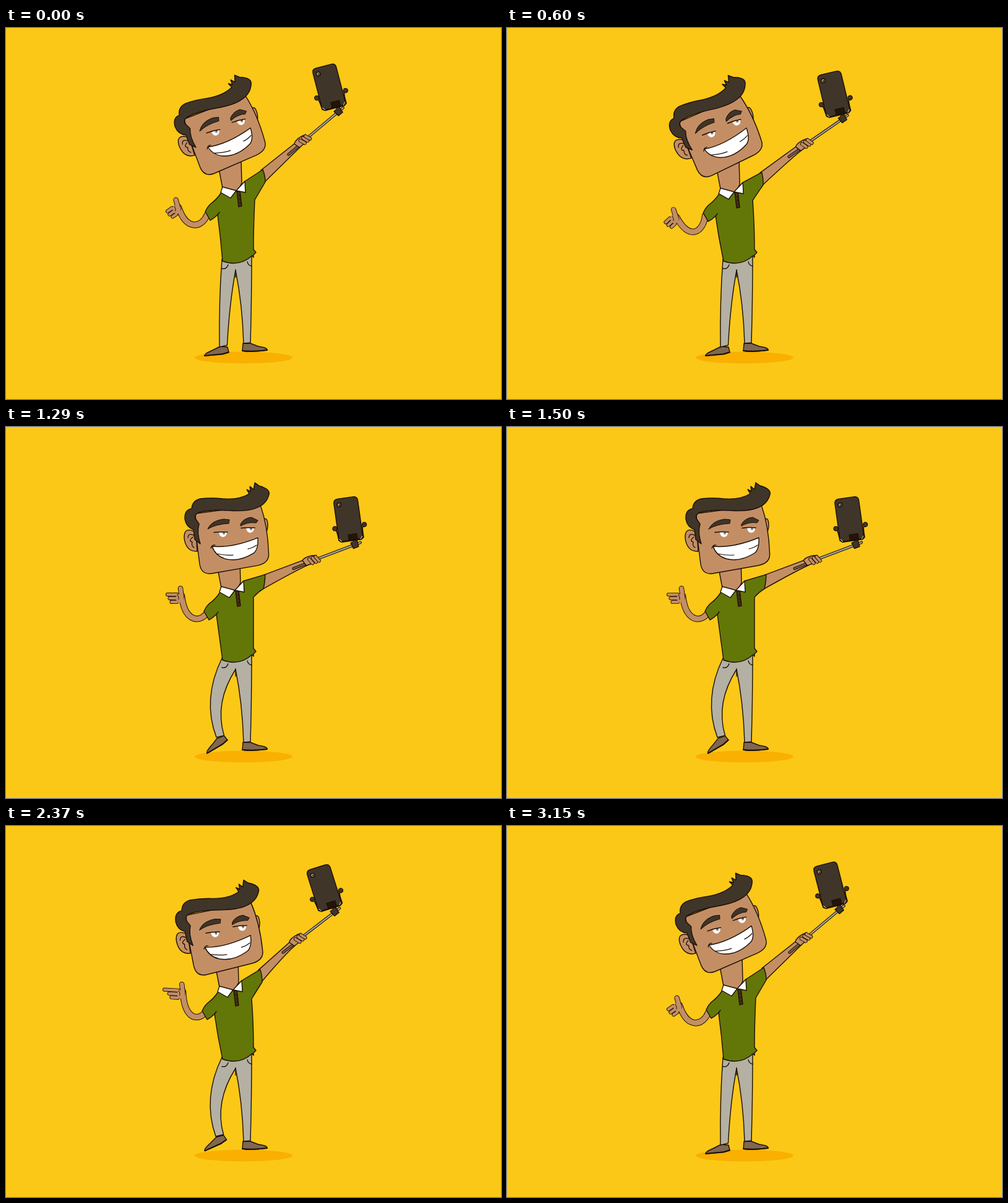
Animation of 800x600 px, one loop 3180 ms. Source, as an HTML page with a canvas:

```html
<!DOCTYPE html>
<html>
<head>
<meta charset="utf-8">
<style>
  html, body { margin: 0; width: 100%; height: 100%; overflow: hidden; background: #fcc817; }
  canvas { display: block; width: 800px; height: 600px; }
</style>
</head>
<body>
<canvas id="stage" width="800" height="600"></canvas>
<script>
const ctx = document.getElementById('stage').getContext('2d');
const INK = '#1d1007', SKIN = '#c48e65', HAIR = '#403529', SHIRT = '#637708',
      PANTS = '#b4b0a3', SHOE = '#806751', WHITE = '#fff';
const LOOP = 3180;
const rad = deg => deg * Math.PI / 180;

// Pose: collar x y | head x y angle scale | stick hand x y angle, phone angle |
//       free hand x y angle, finger stretch | left cuff x y, knee bend, shoe angle
const up    = [372, 262, 350.3, 166.5, -13.5, 1, 479, 183, -40, -14.5, 279, 290, -35, 0, 345, 516, 0, 0];
const dip   = [367, 264, 341.8, 168.7, -16, 1.01, 480, 189, -34.5, -13.5, 274, 306, -43, 0, 345, 516, 0, 0];
const low   = [374, 262, 359, 167.3, -7, 1, 498, 215, -20.7, -7.5, 284, 279, -16, .5, 345, 516, 0, 0];
const step  = [370, 263, 362.3, 173.3, 0, 1, 493, 216, -20.7, -8, 284, 273, 0, .5, 340, 502, -27, -25];
const kiss  = [363, 264, 353.7, 180.2, 3.7, 1.01, 484, 214, -21.4, -8, 281, 273, 8, 1, 339, 516, 3, 22];
const swing = [367, 264, 349.8, 174.2, -4, 1.01, 471, 184, -37.5, -17.5, 286, 268, 3, 1.1, 339, 502, -27, -19];

const mix = (a, b, k) => a.map((v, i) => v + (b[i] - v) * k);
const raise = (dx, dy, turn) => up.map((v, i) => v + ({ 6: dx, 7: dy, 8: turn }[i] || 0));
const rest = raise(3, -3, -3);

const keys = [
  [0, up], [60, up], [150, mix(up, dip, .4)], [300, rest], [510, rest],
  [610, dip], [645, dip], [870, mix(dip, low, 1.08)], [1020, low], [1050, low],
  [1330, mix(low, step, 1.06)], [1500, step], [1590, step],
  [1800, kiss], [1860, kiss], [2100, mix(kiss, step, .04)], [2160, mix(kiss, step, .04)],
  [2370, swing], [2530, raise(4, -11, -9)], [2670, mix(rest, dip, .04)], [2760, rest],
  [2940, rest], [3045, raise(5, -6, -8)], [3150, up], [LOOP, up]
];

function poseAt(t) {
  const i = keys.findIndex(k => k[0] > t);
  const [t0, a] = keys[i - 1], [t1, b] = keys[i];
  return mix(a, b, (1 - Math.cos(Math.PI * (t - t0) / (t1 - t0))) / 2);
}

function draw(path, fill, width = 1.4, stroke = INK) {
  const p = new Path2D(path);
  if (fill) { ctx.fillStyle = fill; ctx.fill(p); }
  if (width) { ctx.lineWidth = width; ctx.strokeStyle = stroke; ctx.stroke(p); }
}

// Fat line with an inked edge
function limb(path, width, color, edge = 1.3) {
  draw(path, null, width + edge * 2, INK);
  draw(path, null, width, color);
}

function dot(x, y, rx, ry, fill, width = 0) {
  ctx.beginPath();
  ctx.ellipse(x, y, rx, ry, 0, 0, 7);
  ctx.fillStyle = fill;
  ctx.fill();
  if (width) { ctx.lineWidth = width; ctx.strokeStyle = INK; ctx.stroke(); }
}

function group(x, y, angle, scale, body) {
  ctx.save();
  ctx.translate(x, y);
  ctx.rotate(rad(angle));
  ctx.scale(scale, scale);
  body();
  ctx.restore();
}

function legs(x, y, bend, shoe) {
  draw('M383 510L382 522Q390 525 422 521Q423 517 408 515L395 510Z', SHOE);
  draw('M382 522Q400 524 422 521', null, 2);
  group(x + 7, y, shoe, 1, () => {
    draw('M6 0L8 8L-2 11L-30 14Q-34 12 -18 5L-6 -1Z', SHOE);
    draw('M8 8.5L-2 11.5L-31 14', null, 2);
  });
  draw(`M349 374Q${344 + bend} 440 ${x} ${y}L${x + 12.5} ${y - 3}Q${361 + bend * .9} 446 371 392` +
       'Q382 446 384 510L395 509Q397 440 397 366Z', PANTS);
  draw('M371 391V403M349 389Q356 391 359 383M390 378Q391 384 397 385', null);
}

function freeArm(cx, cy, x, y, angle, stretch) {
  const sx = cx - 47, sy = cy + 40, drop = y - 268;
  limb(`M${sx} ${sy}C${sx - 14 + drop * .3} ${sy + 12 + drop * .35} ` +
       `${x + 2 + drop * .5} ${y + 40} ${x} ${y}`, 8.5, SKIN, 1);
  group(x, y, 0, 1, () => {
    const thumb = `M0 3L${-2 + angle * .07} -12`;
    dot(-5, 4, 7, 7, SKIN);
    limb(thumb, 6.5, SKIN, 1);
    group(-4, 4, angle, 1, () => {
      [[6, 11 + 3 * stretch], [0, 13 + 5 * stretch], [-6, 13 + 12 * stretch]]
        .forEach(([fy, len]) => limb(`M-4 ${fy}H${-len}`, 4.4, SKIN, .9));
      dot(1, 0, 6.5, 7, SKIN);
    });
    draw(thumb, null, 6, SKIN);
    draw('M-7 -2Q-4 2 -5 6', null, 1);
  });
}

function stickArm(cx, cy, k, x, y, angle) {
  const c = Math.cos(rad(angle)), s = Math.sin(rad(angle));
  const at = (px, py) => `${x + px * c - py * s} ${y + px * s + py * c}`;
  draw(`M${cx + 40 + 6 * k} ${cy - 32 + 9 * k}L${at(-8, -5)}L${at(-8, 5)}` +
       `Q${at(-34, 7)} ${cx + 45 - k} ${cy - 12 + 12 * k}Z`, SKIN);
}

function stick(x, y, angle, phoneAngle) {
  group(x, y, angle, 1, () => {
    limb('M-31 2H-10', 2.5, '#75614c', 1);
    limb('M8 1H85', 2.2, '#aaa69a', 1.1);
    draw('M-13 -5Q-8 -9 4 -7L11 -5L9 5L-10 5Z', SKIN);
    [-1, 5, 10].forEach(fx => limb(`M${fx - 1} -3L${fx + 2} 5`, 4, SKIN, .9));
    draw('M70 -4H81L80 6H71Z', HAIR);
  });
  const a = rad(angle);
  group(x + 76 * Math.cos(a) - Math.sin(a), y + 76 * Math.sin(a) + Math.cos(a), phoneAngle, 1, () => {
    draw('M-1 -10V0', null, 5, HAIR);
    ctx.translate(-4, 0);
    draw('M-25 -30Q-22 -28 -21 -10L-17 -7H15L19 -10Q18 -28 22 -30', null, 2);
    dot(-25, -30, 3.6, 3.6, HAIR, 1.2);
    dot(23, -30, 3.6, 3.6, HAIR, 1.2);
    draw('M-14 -77H11Q18 -77 18 -70V-15Q18 -8 11 -8H-14Q-21 -8 -21 -15V-70Q-21 -77 -14 -77Z', HAIR);
    draw('M-20 -12L-17 -8M17 -12L14 -8', null, 1, '#d8cfb8');
    draw('M-5 -17H9V-8H-5Z', '#241509');
    dot(-13, -67, 4, 4, INK);
    dot(-13, -67, 2.4, 2.4, '#b79a80');
    dot(-12.5, -66.5, 1.5, 1.5, HAIR);
  });
}

function torso(cx, cy, k) {
  const p = (x, y) => `${cx + x} ${cy + y}`;
  group(cx, cy, 0, 1, () => draw('M-29 -40L-22 -3L0 6L9 -11L8 -50Z', SKIN));
  draw(`M${p(-24, 4)}Q${p(-31, 15)} ${p(-42, 23)}Q${p(-47, 28)} ${p(-50, 35)}L${p(-42, 49)}` +
       `Q${p(-36, 46)} ${p(-30, 40)}Q${cx - 25} 340 350 377Q377 387 398 368L400 371L400 367L404 363L400 358` +
       `Q400 320 ${p(30, 16 - 4 * k)}Q${p(37, 4)} ${p(47 - k, -13 + 12 * k)}` +
       `Q${p(47 + 2 * k, -23 + 9 * k)} ${p(43 + 6 * k, -33 + 9 * k)}L${p(14, -14)}L${p(0, 2)}Z`, SHIRT);
  draw(`M${p(-30, 40)}L${p(-27, 36)}`, null);
  group(cx, cy, 0, 1, () => {
    draw('M1 2L6 1L9 26L4 27Z', '#4a3018');
    [9, 15, 21].forEach(y => dot(4.8 + y * .06, y, .9, .9, INK));
    draw('M-22 -5L0 1L-9 13L-25 4Z', WHITE);
    draw('M14 -14L15 4L0 1Z', WHITE);
  });
}

function eye(x, y) {
  draw(`M${x - 6} ${y}Q${x - 5} ${y + 8} ${x + 1} ${y + 8}Q${x + 7} ${y + 7} ${x + 7} ${y}Z`, WHITE, 0);
  dot(x + 2, y + 2, 1.8, 1.8, HAIR);
  dot(x + 2, y + 2.4, .8, .8, WHITE);
  draw(`M${x - 14} ${y + .5}Q${x - 4} ${y - 1} ${x + 8} ${y}`, null, 1.5);
}

function head(x, y, angle, scale, kissing) {
  group(x, y, angle, scale, () => {
    ctx.translate(-362.3, -173.3);
    draw('M416 149Q423 145 423 160Q422 171 418 174Z', SKIN);
    draw('M306 140L309 190L313 222Q316 239 332 237L406 224Q426 220 424.5 204Q423 160 411 126Z', SKIN);
    draw('M304 169Q287 161 288 180Q291 202 309 201L307 172Z', SKIN);
    draw('M305 176Q295 170 294 179M302 178Q294 184 301 186Q299 192 304 195', null, 1.3);
    draw('M314 189L305 182L303 166Q291 162 289 149Q288 134 300 132Q301 119 314 116Q332 114 350 116' +
         'Q377 118 393 108L389 101L395 104L394 96L400 101L402 90L409 95Q427 100 425 109' +
         'Q421 125 404 131Q389 137 360 135Q331 133 312 138Q304 141 306 148L312 157Q308 170 314 189Z', HAIR);
    draw('M326 165Q333 151 352 149L361 150L360 156Q339 157 326 165Z', HAIR, 1);
    eye(350, 170);
    if (kissing) {
      draw('M381 161Q389 154 405 156L411 160L382 163Z', HAIR, 1);
      ctx.setLineDash([4, 3]);
      draw('M381 166Q392 170 405 167', null, 1);
      ctx.setLineDash([]);
      draw('M369 191Q378 193 382 187Q389 187 387 192L382 196Q391 197 390 201Q388 205 380 203', null, 1.7);
    } else {
      draw('M379 157Q385 147 397 146L407 151L404 155Q391 153 379 160Z', HAIR, 1);
      eye(394, 163);
      draw('M333 193Q365 196 407 179Q408 198 400 204Q376 219 354 213Q338 208 333 193Z', WHITE);
      draw('M331 196Q333 190 338 191M341 205Q355 208 367 207M405 191Q398 196 391 197', null, 1.2);
    }
  });
}

function frame(now) {
  const t = now % LOOP;
  const [cx, cy, hx, hy, ha, hs, sx, sy, sa, pa, fx, fy, fa, fs, lx, ly, bend, shoe] = poseAt(t);
  const droop = (sa + 40) / 20;
  ctx.fillStyle = '#fcc817';
  ctx.fillRect(0, 0, 800, 600);
  dot(384, 533, 79, 9.5, '#f9b000');
  legs(lx, ly, bend, shoe);
  freeArm(cx, cy, fx, fy, fa, fs);
  stickArm(cx, cy, droop, sx, sy, sa);
  torso(cx, cy, droop);
  head(hx, hy, ha, hs, t >= 1680 && t < 2250);
  stick(sx, sy, sa, pa);
  requestAnimationFrame(frame);
}

ctx.lineJoin = ctx.lineCap = 'round';
frame(0);
</script>
</body>
</html>
```
